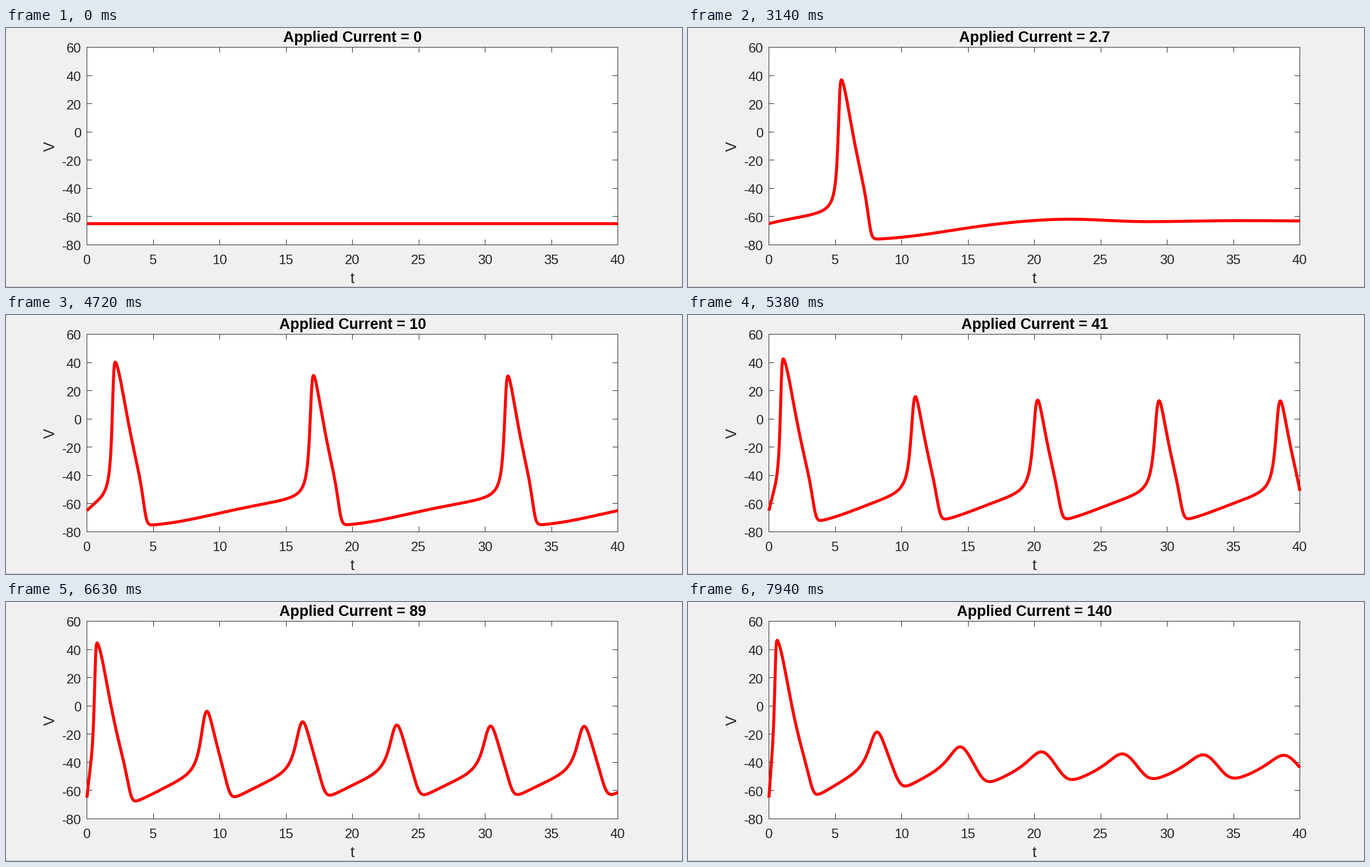
These frames come from a looping animation (1207x464 px, 8000 ms). A matplotlib script:

```python
import numpy as np
import matplotlib.pyplot as plt
from matplotlib.animation import FuncAnimation
from matplotlib.collections import LineCollection

W, H, DPI = 1207, 464, 128
LOOP, STEP = 8000, 20
LEFT, RIGHT, TOP, BOTTOM = 144.5, 1092.5, 34.5, 388.5
T_MAX, V_MIN, V_MAX = 40, -80, 60
TICK = 9.5
INK = "#262626"
PT = 72 / DPI

plt.rcParams["font.family"] = "Liberation Sans"


def px(t):
    return LEFT + (RIGHT - LEFT) * np.asarray(t) / T_MAX


def py(v):
    return BOTTOM - (BOTTOM - TOP) * (np.asarray(v) - V_MIN) / (V_MAX - V_MIN)


# Hodgkin-Huxley membrane under a constant current
def ratio(x):
    return x / -np.expm1(-x)


def rates(v):
    alpha = np.array([ratio((v + 40) / 10),
                      0.07 * np.exp(-(v + 65) / 20),
                      0.1 * ratio((v + 55) / 10)])
    beta = np.array([4 * np.exp(-(v + 65) / 18),
                     1 / (1 + np.exp(-(v + 35) / 10)),
                     0.125 * np.exp(-(v + 65) / 80)])
    return alpha, beta


def slope(state, current):
    v, gates = state[0], state[1:]
    m, h, n = gates
    alpha, beta = rates(v)
    dv = (current - 120 * m**3 * h * (v - 50)
          - 36 * n**4 * (v + 77) - 0.3 * (v + 54.387))
    return np.vstack([dv, alpha * (1 - gates) - beta * gates])


def simulate(current, dt=0.02):
    v = np.full(current.size, -65.0)
    alpha, beta = rates(v)
    state = np.vstack([v, alpha / (alpha + beta)])
    trace = [v]
    for _ in range(round(T_MAX / dt)):
        k1 = slope(state, current)
        k2 = slope(state + dt / 2 * k1, current)
        k3 = slope(state + dt / 2 * k2, current)
        k4 = slope(state + dt * k3, current)
        state = state + dt / 6 * (k1 + 2 * k2 + 2 * k3 + k4)
        trace.append(state[0])
    return np.array(trace).T


# fine, medium and coarse current sweeps
currents = np.concatenate([np.arange(31) / 10,
                           np.arange(3.5, 10.1, 0.5),
                           np.arange(20, 141, 3)])
volts = simulate(currents)
times = np.linspace(0, T_MAX, volts.shape[1])

# a slow start, then a nearly steady pace with one short lag
starts = np.interp(np.arange(currents.size),
                   [0, 1, 2, 27, 32, 85],
                   [0, 640, 1120, 3140, 3780, 7940])

fig = plt.figure(figsize=(W / DPI, H / DPI), dpi=DPI, facecolor="#f0f0f0")
ax = fig.add_axes([0, 0, 1, 1])
ax.set(xlim=(0, W), ylim=(H, 0))
ax.axis("off")


def label(x, y, text, size=24, **style):
    style = {"ha": "center", "va": "baseline", "color": INK, **style}
    return ax.text(x, y, text, fontsize=size * PT, **style)


ax.add_patch(plt.Rectangle((LEFT, TOP), RIGHT - LEFT, BOTTOM - TOP,
                           fc="white", ec=INK, lw=PT, snap=False))
ax.add_patch(plt.Rectangle((0, H - 1), W, 1, fc="#c0c0c0", lw=0))

ticks = []
for t in range(0, T_MAX + 1, 5):
    x = np.floor(px(t)) + 0.5
    ticks += [[(x, TOP), (x, TOP + TICK)], [(x, BOTTOM), (x, BOTTOM - TICK)]]
    label(px(t) - 0.5, 423, str(t))
for v in range(V_MIN, V_MAX + 1, 20):
    y = np.floor(py(v)) + 0.5
    ticks += [[(LEFT, y), (LEFT + TICK, y)], [(RIGHT, y), (RIGHT - TICK, y)]]
    label(134.5, py(v) + 10, str(v), ha="right")
ax.add_collection(LineCollection(ticks, colors=INK, linewidths=PT, snap=False))

label(px(20), 457, "t", 26.8)
label(86.5, 212, "V", 26.8, rotation=90, rotation_mode="anchor")
title = label(px(20) + 0.5, 25, "", 26.8, color="black", weight="bold")
curve, = ax.plot([], [], color="red", lw=5.33 * PT, solid_capstyle="butt",
                 solid_joinstyle="round", clip_on=False, zorder=3)


def draw(frame):
    now = (frame + 0.5) * STEP
    k = np.searchsorted(starts, now, side="right") - 1
    curve.set_data(px(times), py(volts[k]))
    title.set_text(f"Applied Current = {currents[k]:g}")
    return curve, title


anim = FuncAnimation(fig, draw, frames=LOOP // STEP, interval=STEP,
                     repeat=True, repeat_delay=0)
plt.show()
```
